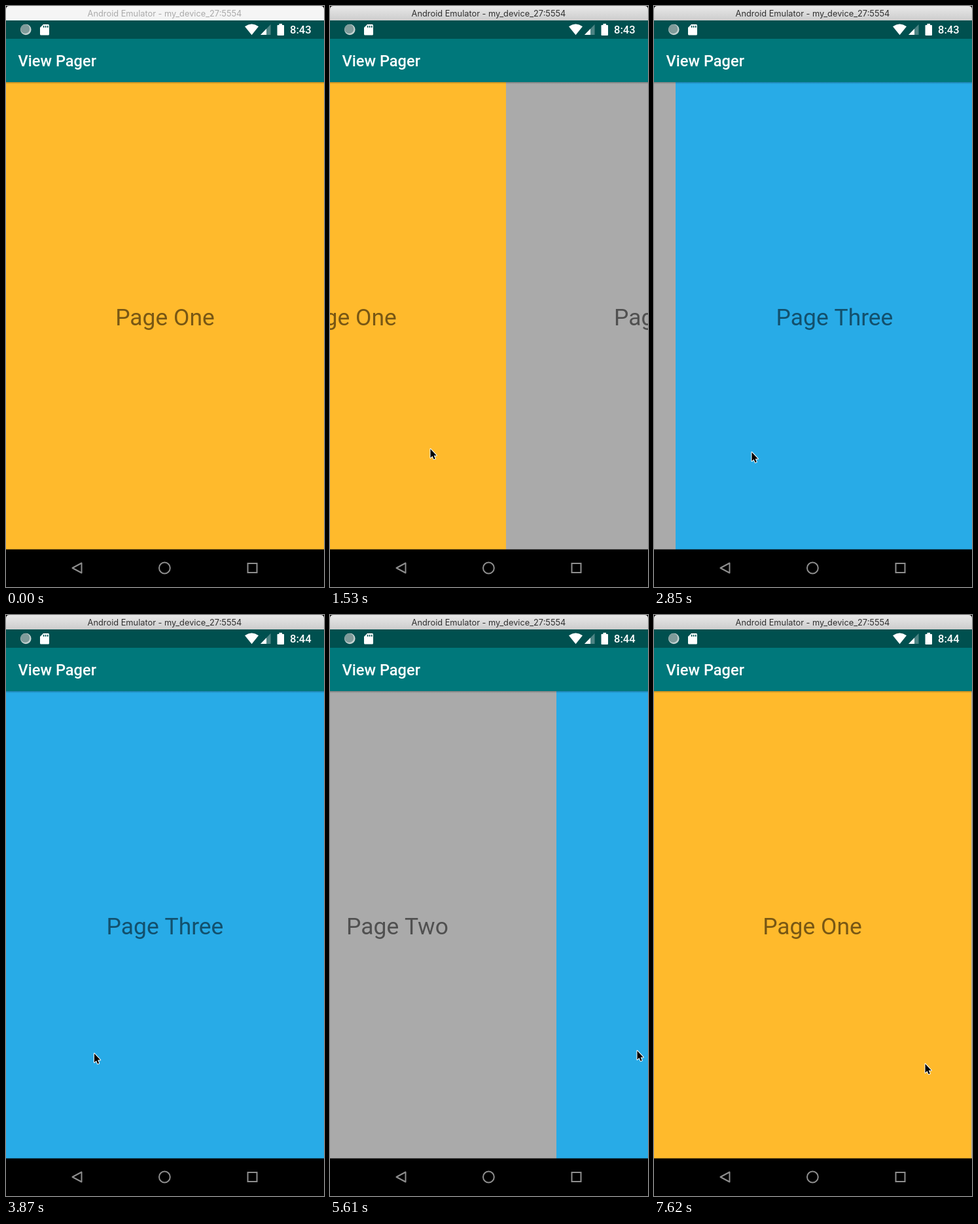
An HTML page with a canvas that plays this animation: 486 px wide and 886 px high, repeating every 7650 ms.

```html
<!DOCTYPE html>
<html lang="en">
<head>
<meta charset="utf-8">
<title>View Pager</title>
<style>
html, body { margin: 0; width: 486px; height: 886px; overflow: hidden; background: #000; }
canvas { display: block; }
</style>
</head>
<body>
<canvas id="stage" width="486" height="886"></canvas>
<script>
const W = 486, LOOP = 7650, STEP = 30;
const ctx = document.getElementById('stage').getContext('2d');

const pages = [['Page One', '#ffba2c'], ['Page Two', '#aaaaaa'], ['Page Three', '#28abe7']];

const linear = p => p;
const out = p => 1 - (1 - p) ** 3;
const smooth = p => p * p * (3 - 2 * p);

// Keys: time, easing into the key, values
const scrollKeys = [
  [0, linear, 0], [900, linear, 0], [1530, linear, .4465], [1620, linear, .54], [2040, out, 1],
  [2430, linear, 1], [2700, linear, 1.6], [2850, linear, 1.932], [3060, out, 2],
  [5130, linear, 2], [5610, linear, 1.288], [5970, out, 1],
  [6540, linear, 1], [6720, linear, .866], [7050, linear, .5], [7620, out, .002]
];
const cursorKeys = [
  [300, linear, 486, 730], [660, out, 385, 690], [870, linear, 385, 690], [1530, linear, 153, 675],
  [1650, out, 110, 674], [1800, linear, 110, 674], [2340, smooth, 405, 690], [2400, linear, 405, 690],
  [2700, linear, 165, 681], [2850, out, 149, 680], [3300, linear, 149, 680], [4200, smooth, 128, 663],
  [5100, linear, 128, 663], [5610, linear, 469, 664], [5800, out, 473, 665], [6450, smooth, 182, 668],
  [6520, linear, 182, 668], [6720, linear, 256, 671], [7050, linear, 432, 683], [7530, smooth, 414, 684]
];

function track(keys, t) {
  const i = keys.findIndex(k => k[0] > t);
  if (i < 0) return keys.at(-1).slice(2);
  if (i === 0) return keys[0].slice(2);
  const [t0, , ...from] = keys[i - 1], [t1, ease, ...to] = keys[i];
  const p = ease((t - t0) / (t1 - t0));
  return from.map((v, n) => v + (to[n] - v) * p);
}

function rect(color, x, y, w, h) {
  ctx.fillStyle = color;
  ctx.fillRect(x, y, w, h);
}

function text(str, font, color, x, y, align = 'left') {
  ctx.font = font;
  ctx.fillStyle = color;
  ctx.textAlign = align;
  ctx.fillText(str, x, y);
}

function fillPath(d, color) {
  ctx.fillStyle = color;
  ctx.fill(new Path2D(d));
}

function strokePath(d, color, width) {
  ctx.strokeStyle = color;
  ctx.lineWidth = width;
  ctx.stroke(new Path2D(d));
}

function disc(x, y, r, color) {
  ctx.fillStyle = color;
  ctx.beginPath();
  ctx.arc(x, y, r, 0, Math.PI * 2);
  ctx.fill();
}

function gradient(y0, y1, top, bottom) {
  const g = ctx.createLinearGradient(0, y0, 0, y1);
  g.addColorStop(0, top);
  g.addColorStop(1, bottom);
  return g;
}

function drawWindowBar(active) {
  rect('#000', 0, 0, W, 22);
  fillPath('M0 22V5Q0 0 5 0H481Q486 0 486 5V22Z',
    active ? gradient(0, 22, '#e8e8e8', '#cdcdcd') : '#f5f5f5');
  text('Android Emulator - my_device_27:5554', '12.8px Inter, sans-serif',
    active ? '#303030' : '#aaa', 242.5, 16, 'center');
}

function drawStatusBar(clock) {
  rect('#00504f', 0, 22, W, 28);
  disc(30.3, 36, 8.3, '#c4d2d1');
  disc(29.3, 35, 7, '#7f9b9a');
  fillPath('M57 28H64.5Q66 28 66 29.5V43Q66 44.5 64.5 44.5H53.5Q52 44.5 52 43V33Z', '#fff');
  fillPath('M57 30h1.5v3h-1.5zM60 30h1.5v3h-1.5zM63 30h1.5v3h-1.5z', '#00504f');
  fillPath('M365 31.2Q375.5 23.8 386 31.2L375.5 44.3Z', '#fff');
  fillPath('M404.5 28V44H389Z', 'rgba(255,255,255,.3)');
  fillPath('M398 34.7V44H389Z', '#fff');
  fillPath('M417.5 27h4.5v2h2Q425 29 425 30V44Q425 45 424 45H415.5Q414.5 45 414.5 44V30Q414.5 29 415.5 29h2Z', '#fff');
  text(clock, '500 16.5px Roboto, sans-serif', '#fff', 434, 42);
}

function drawPages(scroll) {
  pages.forEach(([label, color], i) => {
    const x = Math.round((i - scroll) * W);
    if (Math.abs(x) >= W) return;
    rect(color, x, 116, W, 713);
    text(label, '35.44px Roboto, sans-serif', 'rgba(0,0,0,.53)', x + W / 2, 487, 'center');
  });
}

function drawToolbar() {
  rect('#00787b', 0, 50, W, 66);
  rect(gradient(116, 119, 'rgba(0,0,0,.28)', 'rgba(0,0,0,0)'), 0, 116, W, 3);
  text('View Pager', '500 23.6px Roboto, sans-serif', '#fff', 18.5, 92);
}

function drawNavBar() {
  rect('#000', 0, 828.6, W, 58);
  ctx.lineJoin = 'round';
  strokePath('M101.5 857L115.5 849.5V864.5Z', '#8e8e8e', 2);
  strokePath('M250.8 857a8.4 8.4 0 1 1-16.8 0a8.4 8.4 0 1 1 16.8 0Z', '#8e8e8e', 2);
  ctx.lineJoin = 'miter';
  strokePath('M369.5 850h14v14h-14Z', '#8e8e8e', 2);
}

function drawCursor(x, y) {
  const arrow = 'M.5 .5V14L3.6 11.2 5.7 16.2 7.8 15.3 5.7 10.4H9.8Z';
  ctx.save();
  ctx.translate(x, y);
  ctx.lineJoin = 'round';
  strokePath(arrow, '#fff', 2);
  fillPath(arrow, '#000');
  ctx.restore();
}

function draw(t) {
  drawPages(track(scrollKeys, t)[0]);
  drawToolbar();
  drawStatusBar(t < 3810 ? '8:43' : '8:44');
  drawWindowBar(t >= 690);
  drawNavBar();
  if (t >= 300) drawCursor(...track(cursorKeys, t));
}

const start = performance.now();
function tick() {
  const t = (performance.now() - start) % LOOP;
  draw(Math.floor(t / STEP) * STEP);
  requestAnimationFrame(tick);
}
tick();
</script>
</body>
</html>
```
